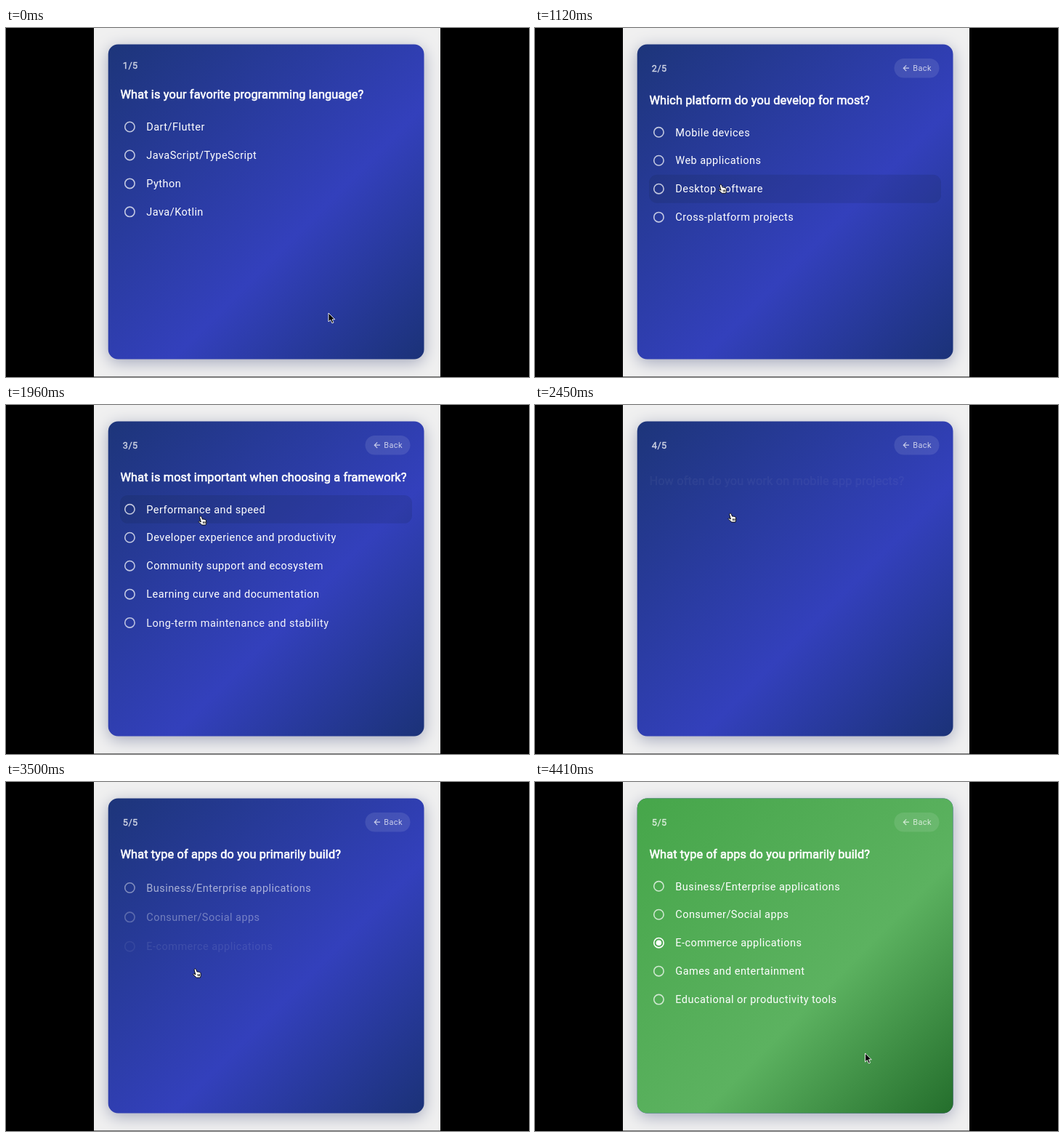
An HTML page with a canvas that plays this animation: 720 px wide and 480 px high, repeating every 4480 ms.

```html
<!DOCTYPE html>
<html lang="en">
<head>
<meta charset="utf-8">
<title>Survey card</title>
<style>
html, body { margin: 0; width: 100%; height: 100%; overflow: hidden; background: #000; }
canvas { display: block; }
</style>
</head>
<body>
<canvas id="stage" width="720" height="480"></canvas>
<script>
const ctx = document.getElementById('stage').getContext('2d');
const LOOP = 4480;
const ROW = 38.95;
const DONE_AT = 3900;

const questions = [
  { at: -1000, click: 420, pick: 1, title: 'What is your favorite programming language?',
    options: ['Dart/Flutter', 'JavaScript/TypeScript', 'Python', 'Java/Kotlin'] },
  { at: 680, click: 1330, pick: 2, title: 'Which platform do you develop for most?',
    options: ['Mobile devices', 'Web applications', 'Desktop software', 'Cross-platform projects'] },
  { at: 1540, click: 2140, pick: 0, title: 'What is most important when choosing a framework?',
    options: ['Performance and speed', 'Developer experience and productivity', 'Community support and ecosystem',
      'Learning curve and documentation', 'Long-term maintenance and stability'] },
  { at: 2400, click: 3050, pick: 3, title: 'How often do you work on mobile app projects?',
    options: ["Daily - it's my main focus", 'Weekly - regular part of my work',
      'Monthly - occasional projects', 'Rarely - just learning or experimenting'] },
  { at: 3295, click: 3850, pick: 2, title: 'What type of apps do you primarily build?',
    options: ['Business/Enterprise applications', 'Consumer/Social apps', 'E-commerce applications',
      'Games and entertainment', 'Educational or productivity tools'] }
];

// Pointer path: time, x, y
const path = [
  [0, 444, 392], [380, 262, 175], [760, 262.5, 175], [1200, 254, 219], [1680, 254, 219],
  [1960, 267, 153], [2480, 268, 149], [2870, 261, 226], [3040, 260, 257], [3560, 259.5, 257],
  [3820, 262, 221], [3960, 262, 221], [4410, 454.5, 373], [LOOP, 454.5, 373]
];

const clamp = v => Math.max(0, Math.min(1, v));
const smooth = v => v * v * (3 - 2 * v);

function diagonal(from, middle, to) {
  const g = ctx.createLinearGradient(141, 23, 575, 455);
  g.addColorStop(0, from);
  g.addColorStop(.6, middle);
  g.addColorStop(1, to);
  return g;
}

const indigo = diagonal('#1d357a', '#3340bc', '#1b3278');
const green = diagonal('#46a64a', '#5cb260', '#246e2c');

function box(x, y, w, h, r, fill) {
  ctx.fillStyle = fill;
  ctx.beginPath();
  ctx.roundRect(x, y, w, h, r);
  ctx.fill();
}

const cardBox = fill => box(140.7, 22.6, 434.8, 432.8, 13.5, fill);

function text(str, x, y, size, spacing, bold = 0) {
  ctx.font = `400 ${size}px Roboto, sans-serif`;
  ctx.letterSpacing = spacing + 'px';
  ctx.fillStyle = ctx.strokeStyle = '#fff';
  ctx.fillText(str, x, y);
  if (bold) {
    ctx.lineWidth = bold;
    ctx.lineJoin = 'round';
    ctx.strokeText(str, x, y);
  }
}

function pointerAt(t) {
  const k = Math.max(1, path.findIndex(p => p[0] > t));
  const a = path[k - 1], b = path[k];
  const e = smooth(clamp((t - a[0]) / (b[0] - a[0])));
  return [a[1] + (b[1] - a[1]) * e, a[2] + (b[2] - a[2]) * e];
}

const arrow = new Path2D('M0 0V12L2.8 9.5L4.9 14L7 13.1L5 8.8H8.7Z');
const hand = new Path2D('M.2 .2C1.2-.5 2 .3 2.3 1.2L3.6 4.3C4.3 3.6 5.1 3.9 5.4 4.6C6 4 6.9 4.2 7.1 5' +
  'C7.8 4.7 8.4 5.2 8.5 6L8.8 9.2L7.9 12H2.8L-1.6 8.1C-2.4 7.2-1.4 6.4-.5 6.9L1.4 8L-.3 1.8C-.5 1.1-.3 .5 .2 .2Z');

function drawPointer(x, y, isHand) {
  ctx.save();
  ctx.translate(x, y);
  ctx.lineWidth = .9;
  ctx.lineJoin = 'round';
  ctx.fillStyle = isHand ? '#fff' : '#000';
  ctx.strokeStyle = isHand ? '#000' : '#fff';
  const shape = isHand ? hand : arrow;
  ctx.fill(shape);
  ctx.stroke(shape);
  if (isHand) {
    ctx.lineWidth = .8;
    ctx.stroke(new Path2D('M4.2 7.2L4.6 10M5.8 7.2L6 10M7.2 7.2V10'));
  }
  ctx.restore();
}

function drawCard(t) {
  ctx.fillStyle = '#000';
  ctx.fillRect(0, 0, 720, 480);
  ctx.fillStyle = '#f0f0f0';
  ctx.fillRect(121, 0, 477, 480);
  ctx.fillStyle = '#777';
  ctx.fillRect(121, 479, 477, 1);

  ctx.shadowColor = 'rgba(50,60,110,.4)';
  ctx.shadowBlur = 22;
  ctx.shadowOffsetY = 5;
  cardBox(indigo);
  ctx.shadowColor = 'transparent';

  ctx.globalAlpha = smooth(clamp((t - DONE_AT) / 250));
  cardBox(green);
  ctx.globalAlpha = 1;
}

function drawHeader(n) {
  ctx.globalAlpha = .72;
  text(`${n + 1}/5`, 160.8, n ? 59.7 : 56, 12.7, .45, .4);
  if (!n) return;
  ctx.globalAlpha = 1;
  box(494.5, 42, 62, 26.5, 13.2, 'rgba(255,255,255,.1)');
  ctx.globalAlpha = .72;
  text('Back', 520.2, 59, 10.9, .45);
  ctx.lineWidth = 1.2;
  ctx.lineJoin = 'miter';
  ctx.stroke(new Path2D('M515 55.2H507.4M511.2 51.3L507.3 55.2L511.2 59.1'));
}

function drawOption(label, y, alpha, hovered, picked) {
  ctx.globalAlpha = alpha;
  if (hovered) box(157, y - 19.4, 402, ROW, 11, 'rgba(20,30,50,.14)');
  ctx.globalAlpha = alpha * (picked ? 1 : .72);
  ctx.strokeStyle = ctx.fillStyle = '#fff';
  ctx.lineWidth = 1.6;
  ctx.beginPath();
  ctx.arc(170.4, y, 6.7, 0, 7);
  ctx.stroke();
  if (picked) {
    ctx.beginPath();
    ctx.arc(170.4, y, 3.8, 0, 7);
    ctx.fill();
  }
  ctx.globalAlpha = alpha;
  text(label, 193.3, y + 5.2, 14.5, .453);
}

function draw(t) {
  drawCard(t);
  const n = questions.findLastIndex(q => q.at <= t);
  const q = questions[n];
  const firstY = n ? 143.3 : 136;
  const [px, py] = pointerAt(t);
  const over = px > 157 && px < 559 ? Math.floor((py - firstY + 19.4) / ROW) : -1;

  drawHeader(n);
  // Each line fades in while rising a few pixels, one after the other.
  const reveal = delay => clamp((t - q.at - delay) / 160);
  const rise = a => 5.5 * (1 - a);
  const a = reveal(45);
  ctx.globalAlpha = a;
  text(q.title, 157.4, (n ? 104.7 : 97.3) + rise(a), 16.31, .15, .6);
  q.options.forEach((label, i) => {
    const b = reveal(110 + 40 * i);
    drawOption(label, firstY + ROW * i + rise(b), b, i === over, t >= q.click && i === q.pick);
  });
  ctx.globalAlpha = 1;
  drawPointer(px, py, over >= 0 && over < q.options.length);
}

const start = performance.now();
function tick() {
  draw((performance.now() - start) % LOOP);
  requestAnimationFrame(tick);
}
tick();
</script>
</body>
</html>
```
